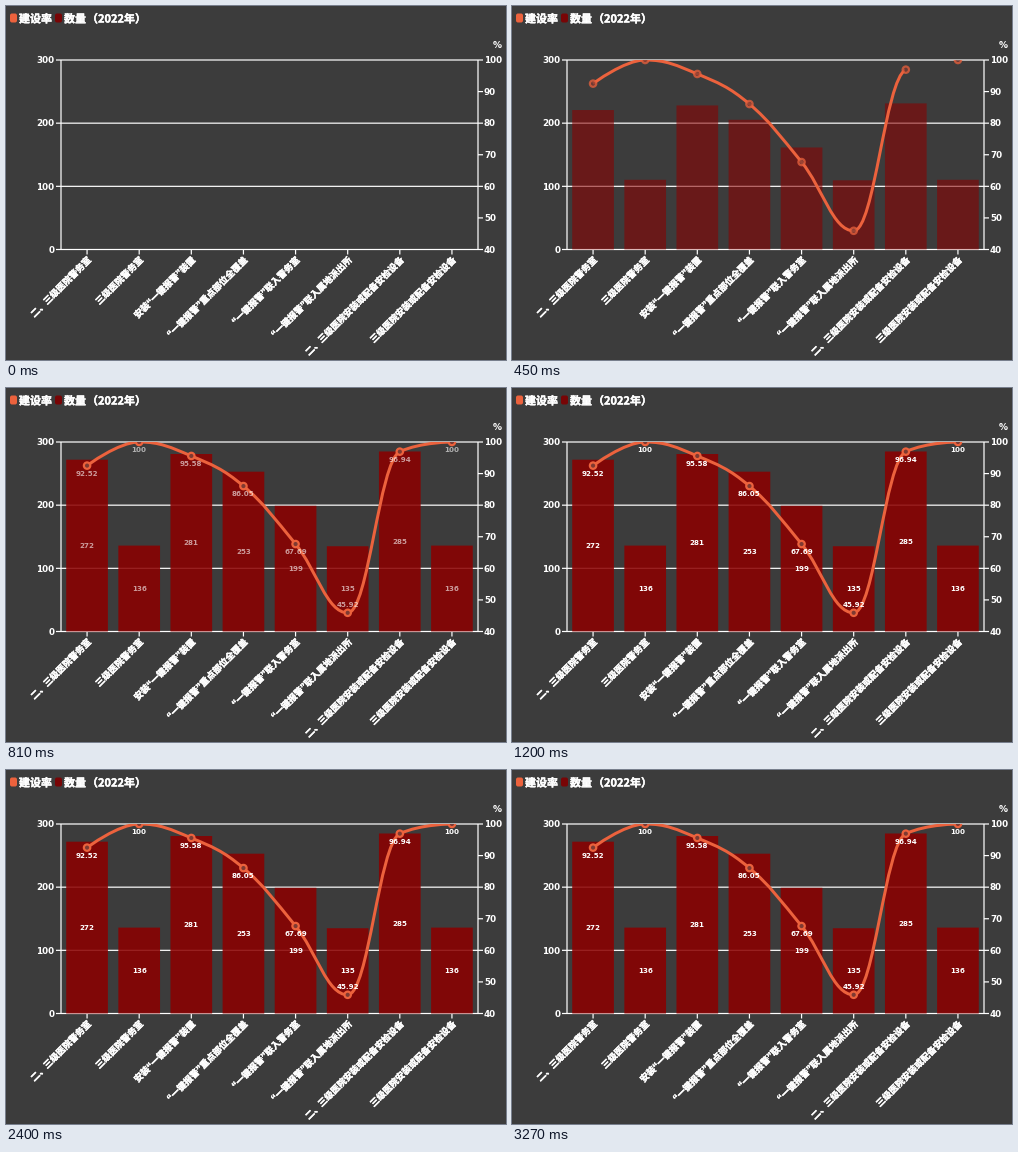
These frames come from a looping animation (500 by 354 pixels, 3300 ms). A matplotlib script:

```python
import numpy as np
import matplotlib.pyplot as plt
from matplotlib.animation import FuncAnimation
from matplotlib.patches import Circle, FancyBboxPatch, PathPatch, Rectangle
from matplotlib.path import Path
from matplotlib.patheffects import withStroke

W, H, DPI = 500, 354, 100
PX = 72 / DPI
STEP, FRAMES = 30, 110
GROW_MS, LABEL_MS = 630, 300

BG, WHITE = "#3c3c3c", "#ffffff"
ORANGE, RED, BAR = "#ec623d", "#780506", "#8b0000"
BAR_ALPHA = 0.87
LEFT, RIGHT, TOP, BOTTOM = 55, 472, 54, 243.5
CJK, DIGITS = "Noto Sans CJK JP", "DejaVu Sans"

names = [
    "二、三级医院警务室", "三级医院警务室", "安装“一键报警”装置",
    "“一键报警”重点部位全覆盖", "“一键报警”联入警务室",
    "“一键报警”联入属地派出所", "二、三级医院安装或配备安检设备",
    "三级医院安装或配备安检设备",
]
counts = [272, 136, 281, 253, 199, 135, 285, 136]
rates = [92.52, 100, 95.58, 86.05, 67.69, 45.92, 96.94, 100]

plt.rcParams["font.weight"] = "bold"

fig = plt.figure(figsize=(W / DPI, H / DPI), dpi=DPI, facecolor=BG)
ax = fig.add_axes([0, 0, 1, 1])
ax.set_xlim(0, W)
ax.set_ylim(H, 0)
ax.axis("off")


def number(x, y, s, size, ha="center", **kw):
    """Digits centred vertically on y."""
    return ax.text(x, y + 0.365 * size, s, fontsize=size * PX, color=WHITE,
                   family=DIGITS, ha=ha, va="baseline", **kw)


def words(x, y, s, size, **kw):
    return ax.text(x, y, s, fontsize=size * PX, color=WHITE, family=CJK,
                   path_effects=[withStroke(linewidth=0.4 * PX,
                                            foreground=WHITE)], **kw)


def rule(xs, ys):
    ax.plot(xs, ys, color=WHITE, lw=1.2 * PX, zorder=1,
            solid_capstyle="butt", snap=False)


def count_y(v):
    return BOTTOM - v / 300 * (BOTTOM - TOP)


def rate_y(v):
    return BOTTOM - (v - 40) / 60 * (BOTTOM - TOP)


def spline(pts, reach=0.4):
    """Bezier spline with handles kept level at local extremes."""
    before, after = pts.copy(), pts.copy()
    for i in range(1, len(pts) - 1):
        a, p, b = pts[i - 1:i + 2]
        back, out = p + (a - p) * reach, p + (b - p) * reach
        slope = (out[1] - back[1]) / (out[0] - back[0])
        back[1] = p[1] + slope * (back[0] - p[0])
        out[1] = p[1] + slope * (out[0] - p[0])
        for h, o, end in ((back, out, a), (out, back, b)):
            h[1] = np.clip(h[1], min(p[1], end[1]), max(p[1], end[1]))
            o[1] = 2 * p[1] - h[1]
        before[i], after[i] = back, out
    verts = [pts[0]]
    for i in range(len(pts) - 1):
        verts += [after[i], before[i + 1], pts[i + 1]]
    return Path(verts, [Path.MOVETO] + [Path.CURVE4] * (len(verts) - 1))


# Legend
for x, color in ((4, ORANGE), (49, RED)):
    ax.add_patch(FancyBboxPatch((x + 2, 9.5), 3, 5, fc=color, ec="none",
                                boxstyle="round,pad=2,rounding_size=2"))
for x, s in ((13, "建设率"), (58, "数量"), (81, "（2022年）")):
    words(x, 16.5, s, 11)

# Axes
for v in range(0, 301, 100):
    y = count_y(v)
    rule([LEFT - 5, RIGHT], [y, y])
    number(48.5, y, str(v), 8.8, ha="right")
for v in range(40, 101, 10):
    y = rate_y(v)
    rule([RIGHT, RIGHT + 5], [y, y])
    number(478, y, str(v), 8.8, ha="left")
for x in (LEFT, RIGHT):
    rule([x, x], [TOP, BOTTOM])
number(491, 39, "%", 9)

band = (RIGHT - LEFT) / len(names)
centers = LEFT + band * (np.arange(len(names)) + 0.5)
for x, name in zip(centers, names):
    rule([x, x], [BOTTOM, BOTTOM + 5])
    words(x + 6, 249.5, name, 9, ha="right", va="top", rotation=45)

# Series
plot_area = Rectangle((LEFT, TOP), RIGHT - LEFT, BOTTOM - TOP,
                      transform=ax.transData)
reveal = Rectangle((LEFT, TOP), 0, BOTTOM - TOP, transform=ax.transData)
bars, rings, labels = [], [], []
points = np.column_stack([centers, [rate_y(v) for v in rates]])
for (x, y), n, r in zip(points, counts, rates):
    bars.append(ax.add_patch(Rectangle((x - 0.4 * band, BOTTOM), 0.8 * band,
                                       0, fc=BAR, ec="none", zorder=2,
                                       snap=False)))
    ring = ax.add_patch(Circle((x, y), 3.2, fc="#7d3a32", ec=ORANGE,
                               lw=2.2 * PX, zorder=4))
    ring.set_clip_path(plot_area)
    rings.append(ring)
    side = -8 if r < 50 else 7.7
    middle = (count_y(n) + BOTTOM) / 2 - 0.5
    labels.append(number(x, middle, str(n), 7.1, zorder=5))
    labels.append(number(x, y + side, f"{r:g}", 7.1, zorder=5))

curve = ax.add_patch(PathPatch(spline(points), fc="none", ec=ORANGE,
                               lw=3 * PX, zorder=3))


def draw(i):
    t = i * STEP
    p = 0.5 - 0.5 * np.cos(np.pi * min(t / GROW_MS, 1))
    for bar, n in zip(bars, counts):
        bar.set_height((count_y(n) - BOTTOM) * p)
        bar.set_alpha(BAR_ALPHA * p ** 2)
    for ring in rings:
        ring.set_alpha(p ** 1.5)
    reveal.set_width((RIGHT - LEFT) * p)
    curve.set_clip_path(reveal)
    shown = np.clip((t - GROW_MS) / LABEL_MS, 0, 1)
    for label in labels:
        label.set_alpha(shown)


anim = FuncAnimation(fig, draw, frames=FRAMES, interval=STEP,
                     repeat=True, repeat_delay=0)
plt.show()
```
